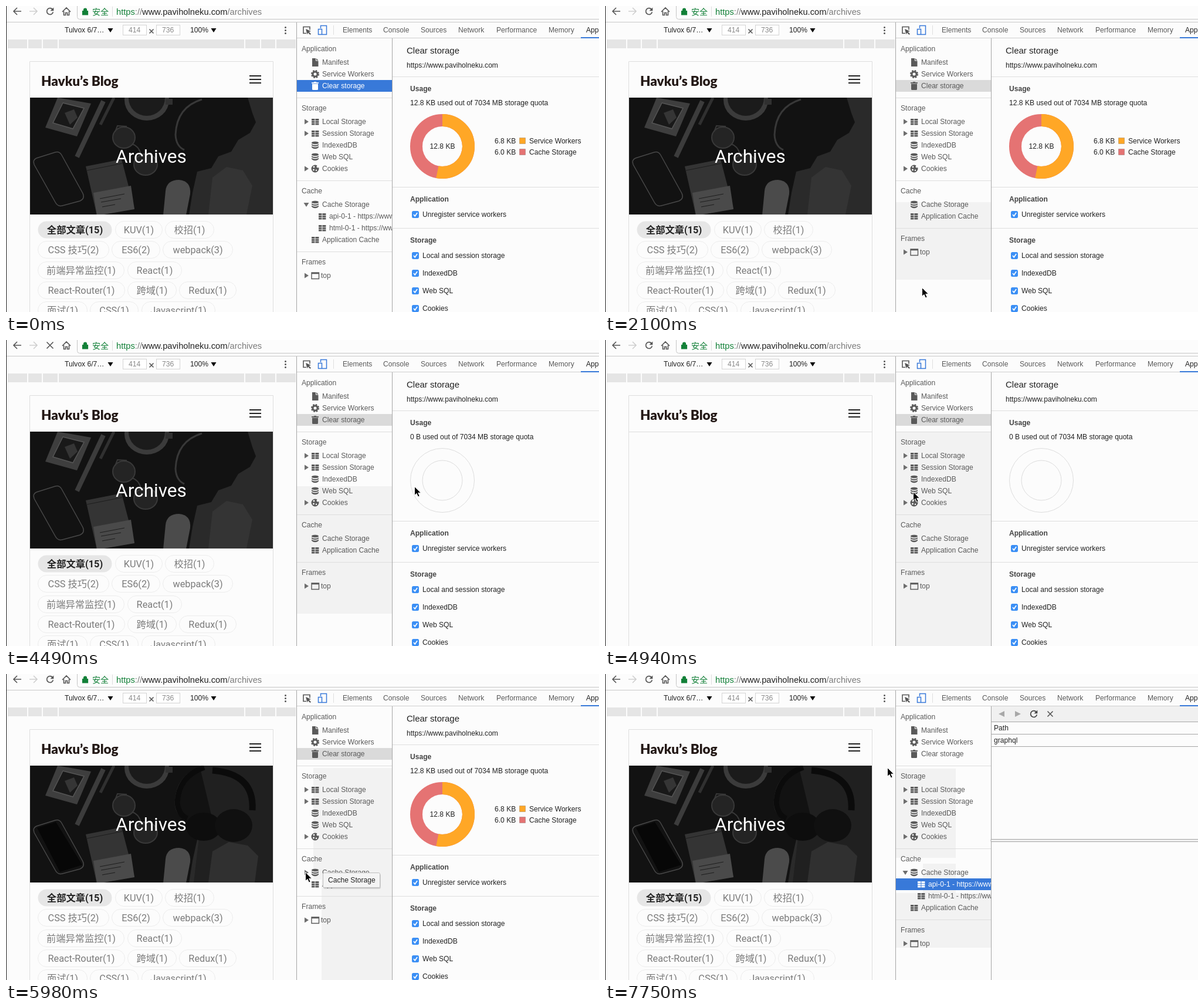
Write an HTML page that moves like this. It is 1011 by 521 pixels and loops after 8 s.

```html
<!DOCTYPE html>
<html lang="zh">
<head>
<meta charset="utf-8">
<title>Clear storage</title>
<style>
html, body { margin: 0; width: 100%; height: 100%; overflow: hidden; background: #fcfcfc; }
svg.stage { display: block; width: 1011px; height: 521px; }
text { font: 12.1px "Liberation Sans", Arial, sans-serif; fill: currentColor; white-space: pre; }
.b { font-weight: 700; }
.side { color: #5a5a5a; }
.main { color: #222; }
.rule { stroke: #dedede; fill: none; }
.edge { stroke: #a6a6a6; fill: none; }
.line { fill: none; stroke: #555; stroke-width: 1.6; }
.url { font-size: 14.7px; }
.brand { font: 900 22.5px Lato, sans-serif; fill: #231815; }
.tag, .title { font: 16.3px Roboto, "Noto Sans CJK SC", "Noto Sans CJK", sans-serif; text-anchor: middle; fill: #7b7b7b; }
.tag.on { font-weight: 700; fill: #222; }
.title { font-size: 31.6px; fill: #fff; }
.pill { fill: none; stroke: #ececec; }
.pill.on { fill: #e6e6e6; stroke: none; }

/* one 8 s loop, every change is a hard cut */
[class*="k-"] { animation: 8s step-end infinite; }
.k-clear { animation-name: clear; }
.k-clearbar { animation-name: clearbar; }
.k-api { animation-name: api; }
.k-apirow { animation-name: apirow; }
.k-html { animation-name: html; }
.k-arrow { animation-name: arrow; }
.k-tail { animation-name: tail; }
.k-used { animation-name: used; }
.k-empty { animation-name: empty; }
.k-reload { animation-name: reload; }
.k-stop { animation-name: stop; }
.k-page { animation-name: page; }
.k-late { animation-name: late; }
.k-tip { animation-name: tip; }
.k-cache { animation-name: cache; }
.k-apibar { animation-name: cache; }
.k-cursor { animation-name: cursor; }
.k-shade { animation-name: shade; }

@keyframes clear { 0% { color: #fff } 16.875%, 100% { color: #5a5a5a } }
@keyframes clearbar { 0% { fill: #3879d9 } 16.875% { fill: #dadada } 85.75%, 100% { fill: transparent } }
@keyframes api { 0% { opacity: 1 } 18.75% { opacity: 0 } 76.5%, 100% { opacity: 1 } }
@keyframes apirow { 0% { color: #5a5a5a } 85.75%, 100% { color: #fff } }
@keyframes html { 0% { opacity: 1 } 18.75% { opacity: 0 } 89.5%, 100% { opacity: 1 } }
@keyframes arrow { 0% { opacity: 0 } 65.5% { opacity: 1 } 76.5%, 100% { opacity: 0 } }
@keyframes tail {
  0% { transform: translateY(40px) } 18.75% { transform: none }
  76.5% { transform: translateY(20px) } 89.5%, 100% { transform: translateY(40px) }
}
@keyframes used { 0% { opacity: 1 } 30% { opacity: 0 } 65.5%, 100% { opacity: 1 } }
@keyframes empty { 0% { opacity: 0 } 30% { opacity: 1 } 65.5%, 100% { opacity: 0 } }
@keyframes reload { 0% { opacity: 1 } 41.25% { opacity: 0 } 59.875%, 100% { opacity: 1 } }
@keyframes stop { 0% { opacity: 0 } 41.25% { opacity: 1 } 59.875%, 100% { opacity: 0 } }
@keyframes page { 0% { opacity: 1 } 58% { opacity: 0 } 63.625%, 100% { opacity: 1 } }
@keyframes late { 0% { opacity: 0 } 63.625%, 100% { opacity: 1 } }
@keyframes tip { 0% { opacity: 0 } 74.75% { opacity: 1 } 76.5%, 100% { opacity: 0 } }
@keyframes cache { 0% { opacity: 0 } 85.75%, 100% { opacity: 1 } }
@keyframes shade {
  0% { d: path("M0 0") }
  18.75% { d: path("M496 334H658V466H496Z") }
  56.125% { d: path("M496 249H658V466H496Z") }
  58% { d: path("M496 156H658V521H496Z") }
  63.625% { d: path("M524 160H658V521H538V350H524Z") }
  89.5%, 100% { d: path("M496 161H598V313H496ZM542 323H598V373H658V466H496V373H542Z") }
}
@keyframes cursor {
  0% { transform: translate(548px, 540px) }
  24.375% { transform: translate(548px, 489px) }
  26.25% { transform: translate(540px, 479px) }
  46.75% { transform: translate(575px, 481px) }
  48.625% { transform: translate(610px, 472px) }
  50.5% { transform: translate(655px, 420px) }
  52.375% { transform: translate(688px, 345px) }
  54.25% { transform: translate(696px, 276px) }
  56.125% { transform: translate(696px, 249px) }
  58% { transform: translate(625px, 251px) }
  59.875% { transform: translate(548px, 256px) }
  61.75% { transform: translate(525px, 258px) }
  63.625% { transform: translate(524px, 264px) }
  65.5% { transform: translate(520px, 290px) }
  67.375% { transform: translate(514px, 318px) }
  69.25% { transform: translate(511px, 333px) }
  71.125% { transform: translate(510px, 337px) }
  78.375% { transform: translate(514px, 341px) }
  80.125% { transform: translate(528px, 347px) }
  82% { transform: translate(542px, 352px) }
  89.5% { transform: translate(545px, 349px) }
  91.375% { transform: translate(549px, 342px) }
  93.125% { transform: translate(562px, 323px) }
  95% { transform: translate(586px, 295px) }
  96.875%, 100% { transform: translate(481px, 159px) }
}
</style>
</head>
<body>
<svg class="stage" viewBox="0 0 1011 521">
  <defs>
    <g id="table" fill="currentColor"><path d="M-6-5h5.4v3h-5.4zM.4-5h6v3h-6zM-6-1.2h5.4v3h-5.4zM.4-1.2h6v3h-6zM-6 2.6h5.4v3h-5.4zM.4 2.6h6v3h-6z"/></g>
    <g id="db" fill="currentColor"><path d="M-6-4c0-3 12-3 12 0s-12 3-12 0zM-6-2c2 2.6 10 2.6 12 0v2c-2 2.6-10 2.6-12 0zM-6 1.6c2 2.6 10 2.6 12 0v2c-2 3.4-10 3.4-12 0z"/></g>
    <g id="file" fill="currentColor"><path d="M-5-7h6v4.5h4.5V7H-5zM2-7l3.500 3.500H2z"/></g>
    <g id="gear"><circle r="4" fill="none" stroke="currentColor" stroke-width="3"/><circle r="6" fill="none" stroke="currentColor" stroke-width="2.200" stroke-dasharray="2.700 2.010"/></g>
    <g id="trash" fill="currentColor"><path d="M-6-6h3.500l1-1h3l1 1H6v1.800H-6zM-5-3.400H5V5.500Q5 7 3.500 7h-7Q-5 7-5 5.500z"/></g>
    <g id="cookie"><circle r="6.500" fill="currentColor"/><g fill="#fcfcfc"><circle cx="-2" cy="-3" r="1.400"/><circle cx="-2.500" cy="2" r="1.400"/><circle cx="2" cy="2.700" r="1.200"/><circle cx="4.500" cy="-3.500" r="2"/></g></g>
    <g id="frame"><path d="M-6-5H6.500V5.500H-6zM-6-3.500H6.500" fill="none" stroke="currentColor" stroke-width="1.400"/></g>
    <path id="right" d="M-3-4.500 4 0-3 4.500z" fill="#6e6e6e"/>
    <path id="down" d="M-4.500-3h9L0 4z"/>
    <g id="again"><path d="M4.600-2.800A5.400 5.400 0 1 0 5.300 1.200" fill="none" stroke="currentColor" stroke-width="1.700"/><path d="M6.300-6.500V-.7H.5z" fill="currentColor"/></g>
    <g id="check"><rect x="-6" y="-6" width="12" height="12" rx="2.500" fill="#3b8ff5"/><path d="M-3 0-.8 2.800 3.200-3" fill="none" stroke="#fff" stroke-width="1.700"/></g>
    <clipPath id="sideclip"><path d="M496 55H658V521H496z"/></clipPath>
    <clipPath id="photo"><path d="M41 156H455V355H41z"/></clipPath>
  </defs>

  <rect width="1011" height="521" fill="#fcfcfc"/>

  <!-- browser bar -->
  <g class="line">
    <path d="M26 9H13M19 3 13 9l6 6"/>
    <path d="M40 9H53M47 3l6 6-6 6" stroke="#cfcfcf"/>
    <path d="M96 10l7-7 7 7M98.500 9v6.500h3v-4h3v4h3V9"/>
    <path class="k-stop" d="M69.500 3.500l11 11M80.500 3.500l-11 11"/>
  </g>
  <g class="k-reload" color="#555"><use href="#again" x="75" y="9"/></g>
  <path d="M121.500-4V18.500q0 4 4 4H1012" fill="none" stroke="#c6c6c6"/>
  <path d="M130.500 8.500h9v6.500h-9zM132.500 8V6.500a2.500 2.500 0 0 1 5 0V8" fill="#128038" stroke="#128038" stroke-width="1.200"/>
  <text x="147" y="15" style="font:14px 'Noto Sans CJK SC','Noto Sans CJK',sans-serif" fill="#128038" color="#128038">安全</text>
  <path class="rule" d="M181.500 1V18"/>
  <text class="url" x="188" y="15" color="#222"><tspan fill="#128038">https</tspan><tspan fill="#7b7b7b">://</tspan>www.paviholneku.com<tspan fill="#7b7b7b">/archives</tspan></text>
  <path d="M0 27.500H1011" stroke="#c8c8c8"/>

  <!-- device bar -->
  <g class="main">
    <text x="100" y="45">Tulvox 6/7…</text>
    <use href="#down" x="178" y="41"/>
    <g fill="#fff" stroke="#d4d4d4"><rect x="199.500" y="32.500" width="40" height="17"/><rect x="256.500" y="32.500" width="40" height="17"/></g>
    <text x="209" y="45" color="#888">414</text>
    <path class="line" d="M244.500 39.500l7 7M251.500 39.500l-7 7"/>
    <text x="266" y="45" color="#888">736</text>
    <text x="314" y="45">100%</text>
    <use href="#down" x="354" y="41"/>
    <g fill="#555"><circle cx="476.500" cy="36.500" r="1.500"/><circle cx="476.500" cy="41.500" r="1.500"/><circle cx="476.500" cy="46.500" r="1.500"/></g>
  </g>
  <path d="M3 57h33v15H3zM38 57h23v15H38zM63 57h25v15H63zM90 57h316v15H90zM408 57h25v15h-25zM435 57h24v15h-24zM461 57h33v15h-33z" fill="#e5e5e5"/>

  <!-- phone page -->
  <path class="rule" d="M40.500 521V94.500H455.500V521M41 156.500H455"/>
  <text class="brand" x="60" y="136">Havku’s Blog</text>
  <path d="M415 119H435M415 125H435M415 131H435" stroke="#222" stroke-width="2"/>
  <g class="k-page">
    <g clip-path="url(#photo)">
      <rect x="41" y="156" width="414" height="199" fill="#121212"/>
      <path d="M412 156H455V355H312L318 318 326 282 350 276 362 256 384 248 396 228 416 216 426 198 420 182z" fill="#2a2a2a"/>
      <path d="M345 355 352 292 376 274 404 280 420 306 410 355z" fill="#343434"/>
      <path d="M334 159Q291 172 289 219 290 239 304 245" fill="none" stroke="#383838" stroke-width="3"/>
      <g class="k-late">
        <path d="M330 156H455V355H320L330 270 350 240z" fill="#202020"/>
        <path d="M338 159Q294 174 292 219 294 240 309 246" fill="none" stroke="#0b0b0b" stroke-width="9"/>
        <path d="M352 164Q424 170 420 232" fill="none" stroke="#0b0b0b" stroke-width="11"/>
        <ellipse cx="337" cy="260" rx="30" ry="24" fill="#0d0d0d"/>
        <ellipse cx="388" cy="258" rx="32" ry="28" fill="#101010"/>
        <path d="M345 355 352 302 380 286 412 292 430 310 424 355z" fill="#303030"/>
      </g>
      <path d="M88 156 145 166 121 222 67 207z" fill="#3e3e3e"/>
      <path d="M97 165 133 174 114 209 80 199z" fill="#191919" stroke="#555" stroke-width="1.500"/>
      <path d="M100 182l16-6 6 14-13 12z" fill="#353535"/>
      <path d="M166 162 121 257" stroke="#3c3c3c" stroke-width="8"/>
      <path d="M184 156 161 202" stroke="#303030" stroke-width="5"/>
      <ellipse cx="240" cy="160" rx="38" ry="35" fill="#3b3b3b"/>
      <ellipse cx="240" cy="157" rx="31" ry="30" fill="#1b1b1b"/>
      <path d="M272 158h12v10h-12z" fill="#303030"/>
      <g fill="#242424" stroke="#393939" stroke-width="2"><ellipse cx="201" cy="224" rx="19" ry="18"/><ellipse cx="238" cy="270" rx="20" ry="18"/><path d="M215 235Q226 238 230 252M186 214l4-10 16 1" fill="none"/></g>
      <path d="M52 259 84 249Q91 247 95 254L131 319Q135 328 126 332L96 340Q88 342 84 334L48 270Q45 262 52 259z" fill="#121212" stroke="#484848" stroke-width="1.500"/>
      <path class="k-late" d="M53 262 85 252 130 325 92 337z" fill="#070707"/>
      <path d="M136 273 197 261 219 345 155 357z" fill="#343434"/>
      <path d="M149 318 213 306 219 346 155 357z" fill="#4a4a4a"/>
      <path d="M138 280 198 268M160 328l42-8M162 334l34-6M164 342l22-4" stroke="#1d1d1d"/>
      <path d="M268 356 272 315Q274 296 295 296 316 298 314 320L307 356z" fill="#4b4b4b"/>
    </g>
    <text class="title" x="247.500" y="267">Archives</text>
    <g id="tags"></g>
  </g>

  <!-- devtools tabs -->
  <path class="edge" d="M495.500 28V521"/>
  <path d="M496 54.500H1011" stroke="#cfcfcf"/>
  <path class="line" stroke-width="1.300" d="M512 46.500h-5v-11h11v5"/>
  <path d="M511 39l9 4-3.500 1 3.500 3.500-1.500 1.500-3.500-3.500-1.500 3z" fill="#555"/>
  <path d="M536.500 38V33.500H546.500V48.500H539M532.500 39.500h6v9h-6z" fill="none" stroke="#3879d9" stroke-width="1.500"/>
  <path class="rule" d="M558.500 33V49"/>
  <g color="#5a5a5a">
    <text x="574" y="45">Elements</text><text x="643" y="45">Console</text><text x="707" y="45">Sources</text>
    <text x="771" y="45">Network</text><text x="836" y="45">Performance</text><text x="925" y="45">Memory</text>
    <text x="989" y="45" color="#222">Application</text>
  </g>
  <path d="M980 53H1011v2H980z" fill="#3879d9"/>

  <!-- sidebar -->
  <g class="side" clip-path="url(#sideclip)">
    <path class="k-shade" fill="#f2f2f2"/>
    <path class="rule" d="M496 156.500H658M496 297.500H658"/>
    <text x="504" y="77">Application</text>
    <use href="#file" x="527" y="96"/><text x="539" y="100">Manifest</text>
    <use href="#gear" x="527" y="116"/><text x="539" y="120">Service Workers</text>
    <rect class="k-clearbar" x="496" y="126" width="162" height="20"/>
    <g class="k-clear"><use href="#trash" x="527" y="136"/><text x="539" y="140">Clear storage</text></g>
    <text x="504" y="178">Storage</text>
    <use href="#right" x="512" y="197"/><use href="#table" x="527" y="197"/><text x="539" y="201">Local Storage</text>
    <use href="#right" x="512" y="217"/><use href="#table" x="527" y="217"/><text x="539" y="221">Session Storage</text>
    <use href="#db" x="527" y="237"/><text x="539" y="241">IndexedDB</text>
    <use href="#db" x="527" y="257"/><text x="539" y="261">Web SQL</text>
    <use href="#right" x="512" y="277"/><use href="#cookie" x="527" y="277"/><text x="539" y="281">Cookies</text>
    <text x="504" y="319">Cache</text>
    <use class="k-arrow" href="#right" x="512" y="338"/>
    <use href="#db" x="527" y="338"/><text x="539" y="342">Cache Storage</text>
    <g class="k-api">
      <use href="#down" x="512" y="338" fill="#6e6e6e"/>
      <rect class="k-apibar" x="496" y="348" width="162" height="20" fill="#3879d9"/>
      <g class="k-apirow"><use href="#table" x="539" y="358"/><text x="551" y="362">api-0-1 - https://www.paviholneku.com</text></g>
    </g>
    <g class="k-html"><use href="#table" x="539" y="378"/><text x="551" y="382">html-0-1 - https://www.paviholneku.com</text></g>
    <g class="k-tail">
      <use href="#table" x="527" y="358"/><text x="539" y="362">Application Cache</text>
      <path class="rule" d="M496 378.500H658"/>
      <text x="504" y="400">Frames</text>
      <use href="#right" x="512" y="419"/><use href="#frame" x="527" y="419"/><text x="537" y="423">top</text>
    </g>
  </g>
  <path class="edge" d="M658.500 55V521"/>

  <!-- clear storage panel -->
  <g class="main">
    <text x="683" y="81" style="font-size:15px">Clear storage</text>
    <text x="683" y="105">https://www.paviholneku.com</text>
    <path class="rule" d="M659 120.500H1011M659 308.500H1011M659 378.500H1011"/>
    <g color="#444"><text class="b" x="689" y="145">Usage</text><text class="b" x="689" y="333">Application</text><text class="b" x="689" y="403">Storage</text></g>
    <g class="k-used">
      <text x="689" y="169">12.8 KB used out of 7034 MB storage quota</text>
      <g fill="none" stroke-width="21" transform="rotate(-90 744 239)">
        <circle cx="744" cy="239" r="44.500" stroke="#e57373"/>
        <circle cx="744" cy="239" r="44.500" stroke="#ffa726" pathLength="128" stroke-dasharray="68 60"/>
      </g>
      <text x="744" y="243" text-anchor="middle">12.8 KB</text>
      <text x="833" y="234">6.8 KB</text><text x="892" y="234">Service Workers</text>
      <text x="833" y="253">6.0 KB</text><text x="892" y="253">Cache Storage</text>
      <g stroke="#0003"><path d="M875.500 224.500h10v10h-10z" fill="#ffa726"/><path d="M875.500 243.500h10v10h-10z" fill="#e57373"/></g>
    </g>
    <g class="k-empty">
      <text x="689" y="169">0 B used out of 7034 MB storage quota</text>
      <g fill="none" stroke="#dcdcdc"><circle cx="744" cy="239" r="54.500"/><circle cx="744" cy="239" r="34"/></g>
    </g>
    <use href="#check" x="698" y="355"/><text x="710" y="359">Unregister service workers</text>
    <use href="#check" x="698" y="425"/><text x="710" y="429">Local and session storage</text>
    <use href="#check" x="698" y="455"/><text x="710" y="459">IndexedDB</text>
    <use href="#check" x="698" y="485"/><text x="710" y="489">Web SQL</text>
    <use href="#check" x="698" y="515"/><text x="710" y="519">Cookies</text>
  </g>

  <!-- cache panel -->
  <g class="k-cache main">
    <path d="M659 55H1011V521H659z" fill="#fcfcfc"/>
    <path d="M659 55H1011V81H659z" fill="#f0f0f0"/>
    <path d="M681 63v10l-10-5zM699 63v10l10-5z" fill="#a8a8a8"/>
    <g color="#444"><use href="#again" x="731" y="68"/></g>
    <path class="line" d="M754.500 63.500l9 9M763.500 63.500l-9 9"/>
    <path class="edge" d="M659 81.500H1011M659 102.500H1011M659 123.500H1011"/>
    <text x="663" y="96">Path</text><text x="663" y="117">graphql</text>
    <path d="M658 281.500H1012V285.500H658z" fill="#f0f0f0" stroke="#a6a6a6"/>
  </g>

  <g class="k-tip main">
    <rect x="541" y="340" width="98" height="26" rx="3" fill="#0002"/>
    <rect x="540.500" y="338.500" width="97" height="25" rx="2" fill="#f4f4f4" stroke="#bdbdbd"/>
    <text x="549" y="355">Cache Storage</text>
  </g>

  <g class="k-cursor"><path d="M.5.500V15.500L4 12.300 6.500 18 9.200 16.800 6.700 11.300H11.500z" fill="#000" stroke="#fff"/></g>
  <path d="M0 0H1V521H0z" fill="#222"/>
</svg>
<script>
// each tag: label, left and right end of its text
const rows = [
  [["全部文章(15)", 71, 164], ["KUV(1)", 203, 250], ["校招(1)", 288, 338]],
  [["CSS 技巧(2)", 71, 159], ["ES6(2)", 197, 246], ["webpack(3)", 284, 370]],
  [["前端异常监控(1)", 71, 185], ["React(1)", 224, 283]],
  [["React-Router(1)", 71, 186], ["跨域(1)", 224, 274], ["Redux(1)", 312, 376]],
  [["面试(1)", 71, 122], ["CSS(1)", 160, 209], ["Javascript(1)", 248, 340]],
];
const tag = ([label, left, right], row, on) => {
  const y = 367 + Math.round(row * 34.3), cls = on ? " on" : "";
  return `<rect class="pill${cls}" x="${left - 16.5}" y="${y - .5}" width="${right - left + 33}" height="29" rx="14.5"/>
    <text class="tag${cls}" x="${(left + right) / 2}" y="${y + 20}">${label}</text>`;
};
document.getElementById("tags").innerHTML =
  rows.map((row, i) => row.map((t, j) => tag(t, i, i + j === 0)).join("")).join("");
</script>
</body>
</html>
```
